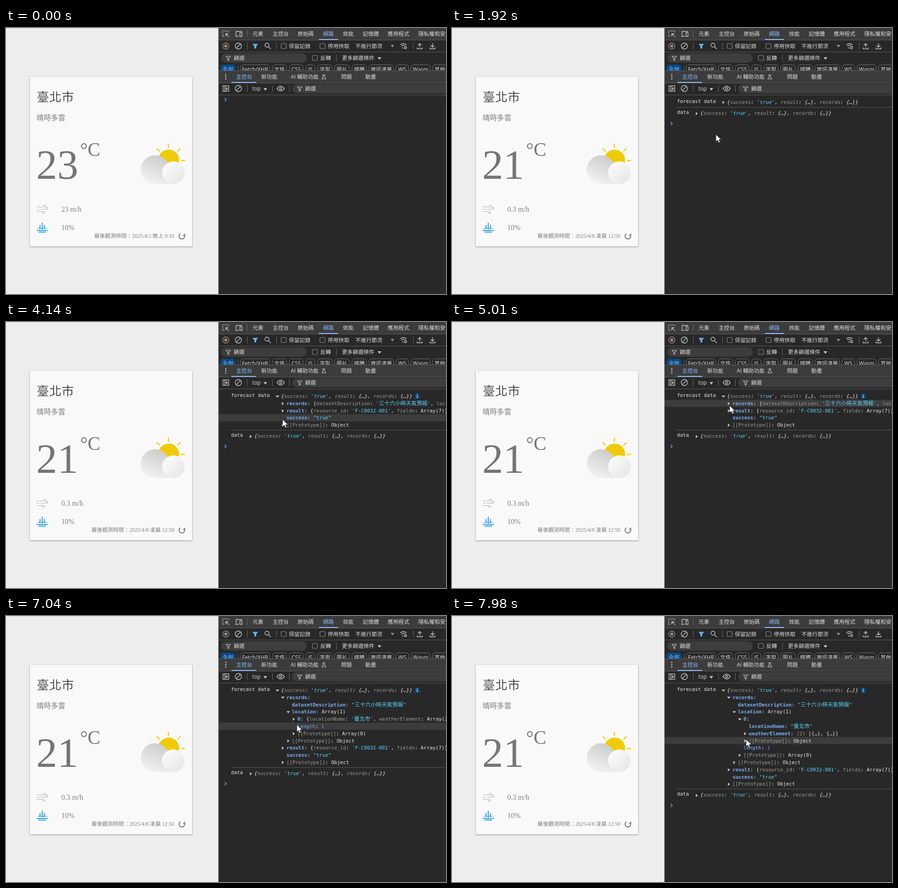
These frames come from a looping animation (962x582 px, 8000 ms). An HTML page:

```html
<!DOCTYPE html>
<html lang="zh-Hant">
<head>
<meta charset="utf-8">
<title>Weather console</title>
<style>
html, body { margin: 0; width: 100%; height: 100%; overflow: hidden; background: #ededed; }
svg { display: block; }
text { white-space: pre; }
.ui text { font: 11.8px "Open Sans", "Noto Sans CJK TC", sans-serif; fill: #dcdcdc; }
.ui text.on { fill: #8ab8fb; }
.icon { fill: none; stroke: #c7c7c7; stroke-width: 1.4; }
.card text { font: 300 15.7px "Liberation Serif", "Noto Sans CJK TC Light", "Noto Sans CJK TC", serif; fill: #808080; }
.card .thin { stroke: #f9f9f9; stroke-width: .5; }
.log text { font: 10.83px "DejaVu Sans Mono", "Noto Sans CJK TC", monospace; fill: #e8e8e8; }
.log .cjk { font-size: 11.8px; font-style: normal; }
.log .it { font-style: italic; }
.log .k { fill: #7cacf8; font-weight: bold; }
.log .l { fill: #5f86c4; font-weight: bold; }
.log .g { fill: #9c9c9c; }
.log .s { fill: #5cd5fb; }
.log .n { fill: #9980ff; }
</style>
</head>
<body>
<svg width="962" height="582" viewBox="0 0 962 582">
  <defs>
    <linearGradient id="back" x1=".75" y1=".1" x2=".3" y2="1">
      <stop offset="0" stop-color="#cdcdcd"/><stop offset="1" stop-color="#f2f2f2"/>
    </linearGradient>
    <linearGradient id="front" x1=".2" y1=".2" x2=".85" y2=".9">
      <stop offset="0" stop-color="#f9f9f9"/><stop offset="1" stop-color="#e7e7e7"/>
    </linearGradient>
    <filter id="shade" x="-5%" y="-5%" width="110%" height="110%">
      <feDropShadow dx="0" dy="1" stdDeviation="1.5" flood-color="#000" flood-opacity=".45"/>
    </filter>
    <clipPath id="chipClip"><rect x="465" y="79" width="497" height="14"/></clipPath>
    <path id="funnel" d="M-4.6-4H4.6L1.2.4V4.6H-1.2V.4Z"/>
    <path id="down" d="M-4-2.5H4L0 3Z"/>
    <g id="clear"><circle r="6.8"/><path d="M-4.8 4.8 4.8-4.8"/></g>
    <rect id="box" width="11" height="11" rx="1.5"/>
  </defs>

  <rect width="464" height="582" fill="#ededed"/>
  <rect width="464" height="1" fill="#cfcfcf"/>

  <g class="card">
    <rect x="52" y="107" width="355" height="370.5" fill="#f9f9f9" filter="url(#shade)"/>
    <text class="thin" x="67" y="161" style="font-size:27.3px;fill:#212121">臺北市</text>
    <text x="67" y="202" style="font-size:15.7px">晴時多雲</text>
    <text id="temp" x="66" y="329.5" style="font-size:92px;fill:#757575"></text>
    <text x="162" y="280" style="font-size:41.5px;fill:#757575">°C</text>
    <text id="wind" x="121" y="402"></text>
    <text x="121" y="442">10%</text>
    <text id="when" x="368" y="459" text-anchor="end" style="font-size:11.8px"></text>

    <path d="M67 391.5H84a2 2 0 1 0-2-2M67 396.5H73M75.5 396.5H89a2.2 2.2 0 1 0-2.2-2.2M67 401.5H82a2 2 0 1 1-2 2"
      fill="none" stroke="#b0b0b0" stroke-width="1.2"/>
    <g fill="none" stroke="#27a0ea" stroke-width="2">
      <path d="M67 443H91.5M71 446.6H87.5M79.3 426V440M74.5 431V439.5M84 431V439.5"/>
      <path d="M76.5 437.2 79.3 440.2 82 437.2M71.5 437 74.5 440M87 437 84 440M68 438.5H69.5M89 438.5H90.5" stroke-width="1.5"/>
    </g>

    <circle cx="355.5" cy="289" r="23" fill="#f0cb05"/>
    <path d="M355 253V262M329.5 263.5 336 270M381.5 263.5 375 270M382.5 290H391.5" stroke="#f0cb05" stroke-width="2.3"/>
    <path d="M366 341H326A31.3 31.3 0 1 1 357 306Z" fill="url(#back)"/>
    <circle cx="366" cy="316.5" r="24.7" fill="url(#front)"/>

    <g id="refresh" fill="none" stroke="#828282" stroke-width="2.2">
      <path d="M-3.2-5.2A6.1 6.1 0 1 0 4.6-4"/>
      <path d="M7.3-6.3V-.8H1.5Z" fill="#828282" stroke="none"/>
    </g>
    <g id="spinner" fill="none" stroke="#828282" stroke-width="2.2">
      <circle r="6" stroke-dasharray="28 10"/>
    </g>
  </g>

  <g class="ui">
    <rect x="464" width="498" height="582" fill="#282828"/>
    <rect x="464" width="1" height="582" fill="#858585"/>
    <rect x="465" width="497" height="26" fill="#3c3c3c"/>
    <rect x="465" y="94" width="497" height="26" fill="#3c3c3c"/>
    <rect x="470.5" y="55.5" width="187" height="20.5" rx="10" fill="#3d3d3d"/>
    <rect x="626" y="122.5" width="360" height="20.5" rx="10" fill="#3d3d3d"/>
    <path d="M465 26.5H962M465 52.5H962M465 93.5H962M465 120.5H962M465 146.5H962" stroke="#5a5a5a"/>
    <path d="M684 25H726M493 119H547" stroke="#8ab8fb" stroke-width="2"/>
    <path id="seps" stroke="#6a6a6a"/>

    <g class="icon">
      <path d="M474 18V6.5H487V10M474 18H478" stroke-dasharray="2 1.5"/>
      <path d="M487.5 19.5 480.5 12.5M480.5 18V12.5H486.5"/>
      <path d="M503 16V7.5H516M501 18H509"/><rect x="511.5" y="10" width="4.5" height="8.5"/>
      <circle cx="480.5" cy="39.5" r="6.8" stroke="#a08c85"/>
      <rect x="477.5" y="36.5" width="6" height="6" fill="#a08c85" stroke="none"/>
      <use href="#clear" x="508" y="39.5"/><use href="#clear" x="508" y="132.5"/>
      <use href="#funnel" x="545" y="39.5" fill="#6cb2fa" stroke="#6cb2fa"/>
      <circle cx="570.5" cy="37.5" r="4.3"/><path d="M573.7 40.7 579 46"/>
      <g stroke="#8c8c8c" stroke-width="1.2">
        <use href="#box" x="601.5" y="34"/><use href="#box" x="686.5" y="34"/><use href="#box" x="670" y="60"/>
      </g>
      <path d="M862 37Q869 31 876 37M864.5 40Q869 36 873 39M866.5 42.5 869 45"/>
      <circle cx="873.5" cy="43" r="2.3"/>
      <path d="M904.5 42.5V34.5M900.5 38 904.5 34 908.5 38M899 42.5V45.5H910V42.5"/>
      <path d="M932.5 33.5V41.5M928.5 38 932.5 42 936.5 38M927 42.5V45.5H938V42.5"/>
      <use href="#funnel" x="486" y="66" stroke-width="1.2"/><use href="#funnel" x="642" y="133" stroke-width="1.2"/>
      <path d="M691.5 102.5H698M693.5 102.5V106L690.5 111.5H699L696 106V102.5" stroke-width="1.2"/>
      <rect x="474.5" y="126.5" width="12.5" height="12"/><path d="M478.5 126.5V138.5M481.5 130V135.5L484.5 132.7Z"/>
      <path d="M592.5 132.5Q600.5 122 608.5 132.5Q600.5 143 592.5 132.5Z"/><circle cx="600.5" cy="132.5" r="2.3"/>
    </g>
    <g fill="#c7c7c7">
      <use href="#down" x="845" y="39.5" fill="#8f8f8f"/><use href="#down" x="816.5" y="66.5"/><use href="#down" x="567" y="134"/>
      <circle cx="480.5" cy="102" r="1.4"/><circle cx="480.5" cy="106.7" r="1.4"/><circle cx="480.5" cy="111.4" r="1.4"/>
    </g>
    <g id="labels"></g>
    <g id="chips" clip-path="url(#chipClip)"></g>
  </g>

  <g class="log">
    <rect id="hover" x="465" width="497" height="15.8" fill="#3c3c3c"/>
    <g id="rows"></g>
    <path id="prompt" d="M478-3.5 481.7 0 478 3.5" fill="none" stroke="#7cacf8" stroke-width="1.4"/>
  </g>

  <g id="pointer" stroke="#222" stroke-width=".8" fill="#fff">
    <path id="arrow" d="M0 0V15.8L3.6 12.3 6.2 18 8.8 16.9 6.3 11.3H11.5Z"/>
    <path id="hand" d="M-1.5 1Q0-1 1.500 1V8L8 9.5Q10 10 9.5 13L8 20H-1.5L-6 13.5Q-5.5 11-3.5 12L-1.5 13.5Z"/>
  </g>
</svg>

<script>
const LOOP = 8000, LINE = 15.8, TOP = 154.2;
const $ = id => document.getElementById(id);
const show = (el, on) => el.setAttribute('display', on ? 'inline' : 'none');
const move = (el, x, y, r = 0) => el.setAttribute('transform', `translate(${x} ${y}) rotate(${r})`);

// Fixed toolbar text: baseline, then x and label pairs; "*" marks the active tab
const labels = [
  [17, 539, '元素', 583, '主控台', 637.5, '原始碼', 693, '*網路', 736.5, '效能', 780, '記憶體', 834.5, '應用程式', 901.5, '隱私權和安全性'],
  [43.5, 618.5, '保留記錄', 703.5, '停用快取', 764, '不進行節流'],
  [69.5, 498, '篩選', 687, '反轉', 734.5, '更多篩選條件'],
  [111, 503, '*主控台', 558, '新功能', 622.5, 'AI 輔助功能', 732.5, '問題', 785.5, '動畫'],
  [137, 538.5, 'top', 654, '篩選']
];
$('labels').innerHTML = labels.map(([y, ...items]) => items.map((s, i) => i % 2
  ? `<text x="${items[i - 1]}" y="${y}"${s[0] === '*' ? ' class="on"' : ''}>${s.replace('*', '')}</text>` : '').join('')).join('');

$('seps').setAttribute('d', [[527.5, 5], [527.5, 32], [591.5, 32], [890.5, 32], [722.5, 58], [527.5, 125], [582.5, 125], [619.5, 125]]
  .map(([x, y]) => `M${x} ${y}v15`).join(''));

const chips = [[469, 33, '全部'], [512, 65, 'Fetch/XHR'], [582, 32, '文件'], [619, 31, 'CSS'], [655, 21, 'JS'], [681, 33, '字型'],
  [718, 33, '圖片'], [756, 33, '媒體'], [793, 55, '資訊清單'], [852, 29, 'WS'], [885, 43, 'Wasm'], [932, 33, '其他']];
$('chips').innerHTML = '<path d="M507.5 82V98" stroke="#6a6a6a"/>' + chips.map(([x, w, s], i) =>
  `<rect x="${x + .5}" y="80.5" width="${w - 1}" height="19" rx="6" fill="${i ? 'none' : '#0a4a80'}" stroke="${i ? '#757575' : '#0a4a80'}"/>` +
  `<text x="${x + w / 2}" y="94.5" text-anchor="middle"${i ? '' : ' class="on"'}>${s}</text>`).join('');

// Console markup: "k|records" colours a piece, pieces are joined with "~"
const mark = s => s.split('~').map(p => {
  const [, c, body] = p.match(/^(?:([klgsn])\|)?(.*)$/);
  return `<tspan class="${c || ''}">${body.replace(/[\u4e00-\u9fff]+/g, '<tspan class="cjk">$&</tspan>')}</tspan>`;
}).join('');
const line = (x, y, s, cls = '') => `<text x="${x}" y="${y}" class="${cls}">${mark(s)}</text>`;
const tri = (x, y, open) => `<path fill="#c7c7c7" d="${open
  ? `M${x - 4} ${y - 1.5}h8l-4 4.3z` : `M${x - 2} ${y - 3.2}v7l4.5-3.5z`}"/>`;

const summary = "{~g|success~: ~s|'true'~, ~g|result~: {…}, ~g|records~: {…}}";
const proto = t => 'g|[[Prototype]]~: ' + t;
const forecast = "'三十六小時天氣預報'";

// Each child row: depth, toggle (0 none, 1 closed, 2 open), text
function children(stage) {
  if (stage < 3) return [];
  const rows = [];
  const add = (...r) => rows.push(r);
  if (stage < 4) add(1, 1, `k|records~: {~g|datasetDescription~: ~s|${forecast}~, ~g|location~: Array(1)}`);
  else {
    add(1, 2, 'k|records~:');
    add(2, 0, `k|datasetDescription~: ~s|${forecast.replace(/'/g, '"')}`);
    if (stage < 5) add(2, 1, 'k|location~: [{…}]');
    else {
      add(2, 2, 'k|location~: Array(1)');
      if (stage < 6) add(3, 1, "k|0~: {~g|locationName~: ~s|'臺北市'~, ~g|weatherElement~: Array(2)}");
      else {
        add(3, 2, 'k|0~:');
        add(4, 0, 'k|locationName~: ~s|"臺北市"');
        add(4, 1, 'k|weatherElement~: ~g|(2) ~[{…}, {…}]');
        add(4, 1, proto('Object'));
      }
      add(3, 0, 'l|length~: ~n|1');
      add(3, 1, proto('Array(0)'));
    }
    add(2, 1, proto('Object'));
  }
  add(1, 1, "k|result~: {~g|resource_id~: ~s|'F-C0032-001'~, ~g|fields~: Array(7)}");
  add(1, 0, 'k|success~: ~s|"true"');
  add(1, 1, proto('Object'));
  return rows;
}

function drawLog(stage) {
  const kids = children(stage), drop = kids.length * LINE;
  let out = '';
  if (stage > 0) {
    out += line(492, 164, 'forecast data') + tri(593.5, 162.5, stage > 2) + line(601.5, 165.8, summary, 'it');
    out += `<path d="M492 ${Math.round(173 + drop) + .5}H962" stroke="#555"/>`;
  }
  if (stage > 2) out += '<rect x="894" y="157" width="10.5" height="10.5" rx="1.5" fill="#004a77"/>' +
    '<text x="896" y="165.8" style="fill:#8ab8fb;font-weight:bold">i</text>';
  kids.forEach(([depth, toggle, s], i) => {
    const y = 162.3 + LINE * (i + 1), x = 601.3 + depth * 11.9;
    out += (toggle ? tri(x - 8, y, toggle > 1) : '') + line(x, y + 3.7, s);
  });
  if (stage > 1) out += line(492, 188 + drop, 'data') + tri(535, 187 + drop) + line(543, 190 + drop, summary, 'it');
  $('rows').innerHTML = out;
  move($('prompt'), 0, stage ? (stage > 1 ? 209 : 184) + drop : 156.5);
  const fresh = stage > 1;
  $('temp').textContent = fresh ? 21 : 23;
  $('wind').textContent = (fresh ? 0.3 : 23) + ' m/h';
  $('when').textContent = '最後觀測時間：' + (fresh ? '2025/4/8 凌晨 12:50' : '2025/4/2 晚上 9:10');
}

// Times at which the console gains its next state
const stages = [1260, 1390, 3200, 5480, 6560, 7580];

// Pointer path: time, x, y
const path = [
  [250, 852, 249], [400, 690, 318], [560, 480, 430], [700, 378, 466], [930, 382, 458],
  [1720, 384, 457], [1800, 470, 335], [1920, 577, 233], [2150, 596, 190], [2460, 590, 160], [2600, 593, 162],
  [3660, 593, 162], [3730, 593, 165], [4000, 604, 229], [4350, 606, 190], [4550, 606, 190], [4680, 607, 184],
  [5010, 607, 183], [5300, 605, 177], [5740, 605, 177], [6000, 611, 199], [6220, 616, 209.5], [6430, 616, 211],
  [6760, 616, 211], [7040, 636, 238], [7300, 632, 231], [7510, 628, 225], [7720, 628, 225], [7980, 643, 270]
];
function pointerAt(t) {
  const i = path.findIndex(p => p[0] > t);
  if (i < 1) return path[path.length - 1].slice(1);
  const [t0, x0, y0] = path[i - 1], [t1, x1, y1] = path[i], k = (t - t0) / (t1 - t0);
  return [x0 + (x1 - x0) * k, y0 + (y1 - y0) * k];
}

let drawn = -1;
function render(t) {
  const stage = stages.filter(s => t >= s).length;
  if (stage !== drawn) drawLog(drawn = stage);

  const [x, y] = pointerAt(t);
  const overIcon = Math.hypot(x - 384.5, y - 455) < 9;
  show($('pointer'), t >= 250);
  move($('pointer'), x, y);
  show($('hand'), overIcon);
  show($('arrow'), !overIcon);

  show($('hover'), t >= 3730);
  $('hover').setAttribute('y', TOP + LINE * Math.max(0, Math.floor((y - TOP) / LINE)));

  const busy = t >= 1130 && t < 1390;
  show($('refresh'), !busy);
  show($('spinner'), busy);
  move($('spinner'), 384.5, 455, (t - 1130) * .24);
}

move($('refresh'), 384.5, 455.5);
render(0);
let start;
requestAnimationFrame(function frame(now) {
  start ??= now;
  render((now - start) % LOOP);
  requestAnimationFrame(frame);
});
</script>
</body>
</html>
```
